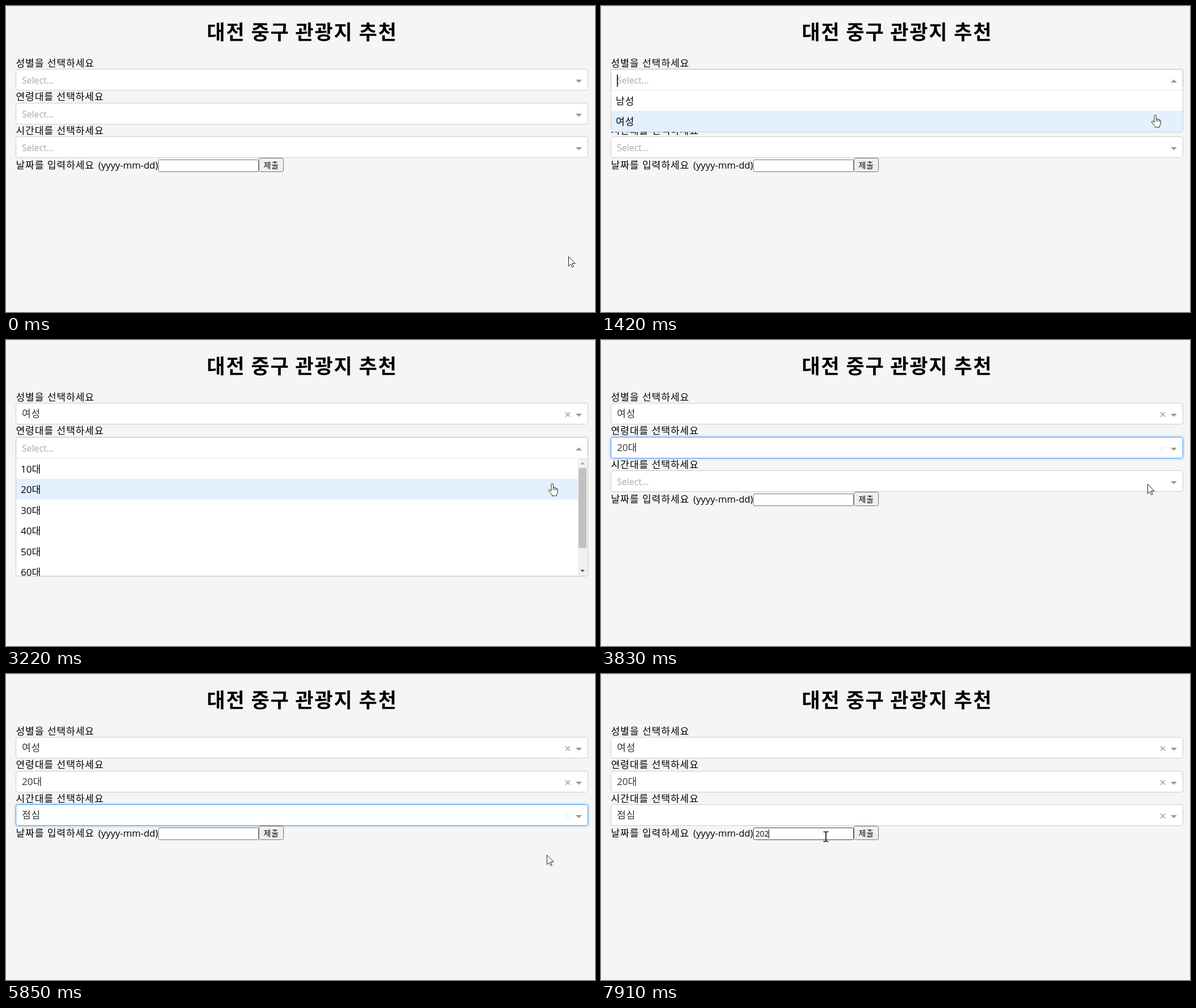
An HTML page for the animation above (8 s loop, 1037 px wide and 540 px high).

```html
<!DOCTYPE html>
<html lang="ko">
<head>
<meta charset="utf-8">
<title>관광지 추천</title>
<style>
  html, body { margin: 0; width: 100%; height: 100%; overflow: hidden; background: #f5f5f5; }
  svg { display: block; }
  text {
    font: 17px "Open Sans", "Noto Sans CJK KR", "Noto Sans CJK", sans-serif;
    letter-spacing: .96px;
    white-space: pre;
  }
  .title { font-size: 35px; font-weight: 700; letter-spacing: 1.8px; word-spacing: -1px; }
  .latin { font-size: 16.6px; letter-spacing: 0; }
  .hint { font-size: 15.8px; letter-spacing: 0; fill: #aaa; }
  .value { fill: #333; }
  .num { letter-spacing: 0; }
  .small { font-size: 14px; letter-spacing: .5px; }
  .typed { font-size: 13.6px; letter-spacing: 0; }
  .box { fill: #fff; stroke: #ccc; }
  .glow { fill: none; stroke: #007eff; stroke-opacity: .13; stroke-width: 3; }
  .focus .box { stroke: #3d94ee; }
  .open .box { stroke: #b8b8b8; }
  .arrow { fill: #999; }
  .clear { fill: none; stroke: #999; stroke-width: 1.3; }
  .native { stroke: #767676; }
  .cursor { fill: #fff; stroke: #222; stroke-linejoin: round; }
</style>
</head>
<body>
<svg id="stage" width="1037" height="540" viewBox="0 0 1037 540"></svg>
<script>
const LOOP = 8000, ROW = 36.5, LEFT = 17.5, WIDTH = 1007;

const fields = [
  { y: 111.5, label: '성별을 선택하세요', base: 106.5, options: ['남성', '여성'],
    height: 73.5, open: 930, close: 1960, blur: 2690, fade: 1940, caretOff: 1520 },
  { y: 171.5, label: '연령대를 선택하세요', base: 166, options: ['10대', '20대', '30대', '40대', '50대', '60대'],
    height: 208, open: 2690, close: 3760, blur: 4490, fade: 3800, caretOff: 3220, scroll: true },
  { y: 230.5, label: '시간대를 선택하세요', base: 226, options: ['오전', '점심', '오후', '저녁', '심야'],
    height: 182.5, open: 4490, close: 5720, blur: 6780, fade: 5820, caretOff: 5100 }
];

// start, end, number of steps, destination
const moves = [
  [80, 540, 8, 974.5, 142],
  [1180, 1420, 5, 976, 193],
  [2890, 3220, 6, 962, 254],
  [4890, 5030, 3, 952, 319],
  [5990, 6510, 8, 396, 287]
];
const clicks = [[930, 1020], [1900, 1990], [2690, 2820], [3690, 3800], [4490, 4620], [5650, 5760], [6710, 6850]];
const keys = [[7570, '2'], [7770, '20'], [7910, '202']];

const within = (t, a, b) => t >= a && t < b;
const clamp = v => Math.min(1, Math.max(0, v));
const text = (x, y, str, cls = '') => `<text x="${x}" y="${y}" class="${cls}">${str}</text>`;
const rect = (x, y, w, h, attrs) => `<rect x="${x}" y="${y}" width="${w}" height="${h}" ${attrs}/>`;

function fieldMarkup(f, i) {
  const num = f.scroll ? ' num' : '';
  return text(17.5, f.base, f.label) + `<g id="field${i}">` +
    rect(LEFT - 2, f.y - 2, WIDTH + 4, 41, 'rx="6" class="glow"') +
    rect(LEFT, f.y, WIDTH, 37, 'rx="4" class="box"') +
    text(28, f.y + 25, 'Select...', 'hint') +
    text(28, f.y + 24.5, f.options[1], 'value' + num) +
    `<path class="clear" d="M985 ${f.y + 16}l8 8m0-8l-8 8"/>` +
    `<path class="arrow down" d="M1003 ${f.y + 18.5}h11l-5.5 5.5z"/>` +
    `<path class="arrow up" d="M1003 ${f.y + 23.5}h11l-5.5-5.5z"/>` +
    rect(28, f.y + 9.5, 1.6, 21.5, 'class="caret"') + '</g>';
}

function scrollbar(top) {
  return rect(1007, top, 17, 208, 'fill="#f1f1f1"') +
    rect(1008, top + 17.5, 14, 141, 'fill="#c1c1c1"') +
    `<path fill="#a3a3a3" d="M1011 ${top + 11}h8l-4-4z"/>` +
    `<path fill="#505050" d="M1011 ${top + 197}h8l-4 4z"/>`;
}

function menuMarkup(f, i) {
  const top = f.y + 37, bottom = top + f.height;
  const edge = `M${LEFT} ${f.y + 32}V${bottom - 4}q0 4 4 4h${WIDTH - 8}q4 0 4-4V${f.y + 32}`;
  const rows = f.options.map((o, k) =>
    text(26, top + 25 + k * ROW, o, f.scroll ? 'num' : '')).join('');
  return `<clipPath id="clip${i}"><path d="${edge}z"/></clipPath>
    <g id="menu${i}">
      <path d="${edge}" fill="#fff"/>
      <path d="M18 ${top}h1006" stroke="#e6e6e6"/>
      <g clip-path="url(#clip${i})">
        ${rect(18, top, f.scroll ? 989 : 1006, ROW, 'class="hover" fill="#e4f0fe"')}
        ${rows}${f.scroll ? scrollbar(top) : ''}
      </g>
      <path d="${edge}" fill="none" stroke="#ccc"/>
      <path d="M20 ${bottom + 1}h1002" stroke="#000" stroke-opacity=".05"/>
    </g>`;
}

const stage = document.getElementById('stage');
stage.innerHTML =
  rect(0, 0, 1037, 540, 'fill="#f5f5f5"') + rect(0, 0, 1037, 1, 'fill="#e2e2e2"') +
  text(353.5, 59, '대전 중구 관광지 추천', 'title') +
  fields.map(fieldMarkup).join('') +
  text(17.5, 286.5, '날짜를 입력하세요') + text(162.5, 286.5, '(yyyy-mm-dd)', 'latin') +
  rect(268.5, 271.5, 176, 21, 'id="input" rx="2" fill="#fff" class="native"') +
  text(272, 286.5, '', 'typed') +
  rect(272, 274, 1, 16, 'id="inputCaret"') +
  rect(445.5, 268.5, 43, 24, 'rx="3" fill="#efefef" class="native"') +
  text(453.5, 286, '제출', 'small') +
  fields.map(menuMarkup).join('') +
  `<g id="pointer">
    <circle id="click" cx="-1" r="12.5" fill="#ffff80"/>
    <path id="default" class="cursor" d="M.5.5v16.6l3.8-3.6 2.7 5.6 2.3-1-2.6-5.6h5.5z"/>
    <g id="hand" class="cursor">
      <path d="M-2 12.5V1.2a1.8 1.8 0 0 1 3.6 0V7.6a1.5 1.5 0 0 1 3 .3 1.5 1.5 0 0 1 2.9.5 1.4 1.4 0 0 1 1.7 1.4V14q0 3-2 5v2H-.5v-1.500q-2.500-3-6-7.500 0-2.500 2-1.800z"/>
      <path d="M1.600 7.600v3.500m3-3v3m2.900-2.700v2.700" fill="none"/>
    </g>
    <path id="beam" fill="none" stroke="#111" d="M-4.500-8.500h3.500l1 1 1-1h3.500M0-7.500v15M-4.500 8.500h3.500l1-1 1 1h3.500"/>
  </g>`;

const $ = s => stage.querySelector(s);
const show = (el, on) => { el.style.display = on ? '' : 'none'; };
const parts = fields.map((f, i) => {
  const g = $('#field' + i), menu = $('#menu' + i), p = { g, menu, hover: menu.querySelector('.hover') };
  for (const c of ['glow', 'hint', 'value', 'clear', 'down', 'up', 'caret']) p[c] = g.querySelector('.' + c);
  return p;
});
const [pointer, click, arrow, hand, beam, input, inputCaret, typed] =
  ['#pointer', '#click', '#default', '#hand', '#beam', '#input', '#inputCaret', '.typed'].map($);

function pointerAt(t) {
  let x = 990, y = 442;
  for (const [from, to, n, tx, ty] of moves) {
    if (t < from) break;
    const p = clamp((Math.floor((t - from) * (n - 1) / (to - from) + 1e-6) + 1) / n);
    const e = p * p * (3 - 2 * p);
    x += (tx - x) * e;
    y += (ty - y) * e;
  }
  return [x, y];
}

function draw(t) {
  const [x, y] = pointerAt(t);
  let kind = arrow;

  fields.forEach((f, i) => {
    const p = parts[i], top = f.y + 37;
    const open = within(t, f.open, f.close), focus = within(t, f.close, f.blur), done = t >= f.close;
    p.g.setAttribute('class', open ? 'open' : focus ? 'focus' : '');
    show(p.glow, focus);
    show(p.hint, !done);
    show(p.value, done);
    show(p.down, !open);
    show(p.up, open);
    show(p.caret, open && t < f.caretOff);
    show(p.menu, open);
    p.clear.style.opacity = done ? clamp((t - f.fade) / 170) : 0;
    if (open) {
      kind = y > top ? hand : beam;
      p.hover.setAttribute('y', top + ROW * Math.max(0, Math.floor((y - top) / ROW)));
    }
  });

  if (within(x, 268, 445) && within(y, 271, 293)) kind = beam;
  for (const el of [arrow, hand, beam]) show(el, el === kind);
  beam.setAttribute('stroke-width', y > 270 ? 1.7 : 1.2);
  pointer.setAttribute('transform', `translate(${x} ${y})`);
  show(click, clicks.some(([a, b]) => within(t, a, b)));

  const value = keys.reduce((v, [at, str]) => t >= at ? str : v, '');
  if (typed.textContent !== value) typed.textContent = value;
  inputCaret.setAttribute('x', Math.round(272 + 7.8 * value.length));
  show(inputCaret, within(t, 6780, 7300) || t >= 7570);
  input.style.stroke = t >= 6780 ? '#444' : '';
}

const start = performance.now();
function tick() {
  draw((performance.now() - start) % LOOP);
  requestAnimationFrame(tick);
}
tick();
</script>
</body>
</html>
```
